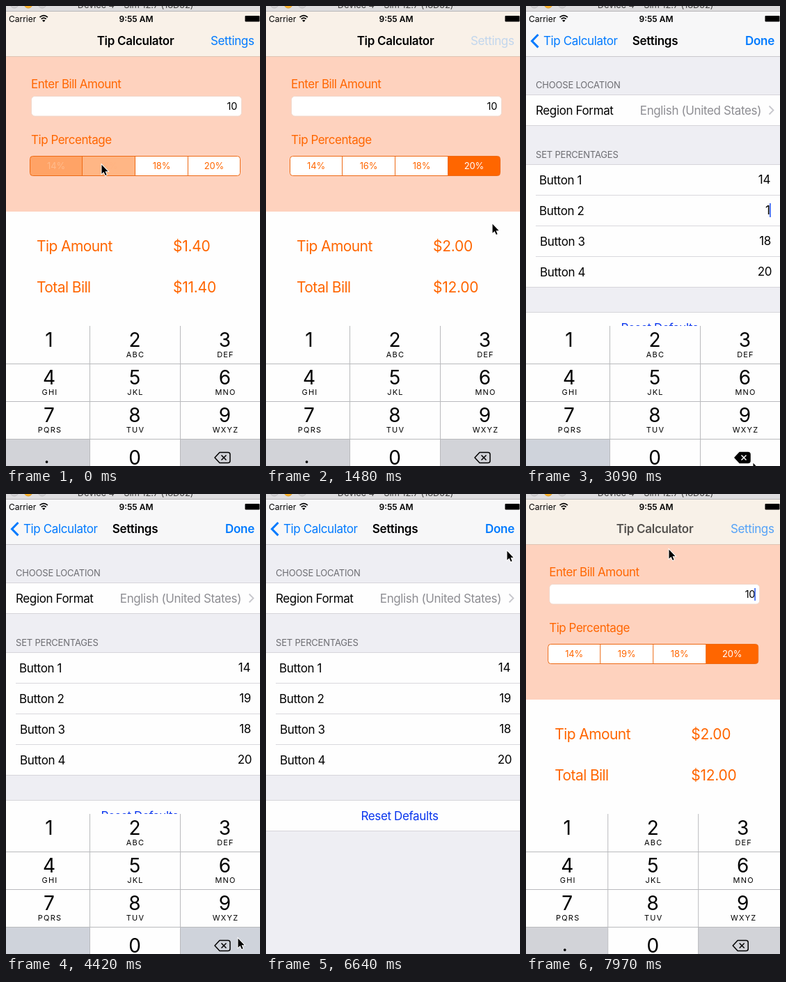
Animation, 365 px wide and 660 px high, one loop 8000 ms. Source, as an HTML page:

```html
<!DOCTYPE html>
<html lang="en">
<head>
<meta charset="utf-8">
<title>Tip Calculator</title>
<style>
html, body { margin: 0; width: 100%; height: 100%; overflow: hidden; background: #fefefe; }
svg { display: block; width: 365px; height: 660px; }
text { font: 17px Inter, "Open Sans", sans-serif; letter-spacing: -.022em; white-space: pre; }
.bold { font-weight: 600; letter-spacing: -.017em; }
.mid { text-anchor: middle; }
.end { text-anchor: end; }
.bar { font-size: 12px; letter-spacing: 0; }
.orange { fill: #ff6600; letter-spacing: -.028em; }
.big { font-size: 21px; }
.money { letter-spacing: -.012em; }
.seg { font-size: 13px; letter-spacing: -.01em; }
.amount { font-size: 14.5px; letter-spacing: -.02em; }
.head { font-size: 13px; letter-spacing: -.015em; fill: #6d6d72; }
.digit { font-size: 28px; letter-spacing: 0; }
.abc { font-size: 11px; letter-spacing: 1.2px; }
.blue { fill: #007aff; }
</style>
</head>
<body>
<svg id="stage" viewBox="0 0 365 660"></svg>
<script>
const STEP = 147.4, LOOP = 8000;
const $ = id => document.getElementById(id);
const text = (x, y, s, cls = '', id = '') => `<text x="${x}" y="${y}" class="${cls}" id="${id}">${s}</text>`;
const rect = (x, y, w, h, fill, more = '') => `<rect x="${x}" y="${y}" width="${w}" height="${h}" fill="${fill}" ${more}/>`;
const range = (n, f) => Array.from({ length: n }, (_, i) => f(i)).join('');

// Numeric keypad; name prefixes the parts that change
function keypad(name, side, dot) {
  const letters = ['', 'ABC', 'DEF', 'GHI', 'JKL', 'MNO', 'PQRS', 'TUV', 'WXYZ'];
  const cols = [62, 185, 314.5];
  return `<g id="${name}">` + rect(0, 459, 380, 201, '#fefefe') +
    rect(0, 621, 120, 39, side) + rect(250, 621, 130, 39, side, `id="${name}Del"`) +
    rect(250, 567, 130, 54, '#d0d3da', `id="${name}Nine" visibility="hidden"`) +
    range(3, i => rect(0, 513 + 54 * i, 380, 1, '#b9babd')) +
    rect(120, 459, 1, 201, '#b9babd') + rect(250, 459, 1, 201, '#b9babd') +
    range(9, i => {
      const x = cols[i % 3], y = 489 + 54 * Math.floor(i / 3);
      return text(x, y, i + 1, 'digit mid') + text(x + 1, y + 15, letters[i], 'abc mid');
    }) +
    text(185, 658, 0, 'digit mid') + (dot ? text(58.5, 656, '.', 'digit mid') : '') +
    `<path id="${name}Icon" d="M307 640.5H319Q322 640.5 322 643.5V652.5Q322 655.5 319 655.5H307L300 648Z"
      fill="none" stroke="#000" stroke-width="1.5" stroke-linejoin="round"/>
    <path id="${name}Cross" d="M309.5 644.5l7 7m0-7l-7 7" stroke="#000" stroke-width="1.5"/></g>`;
}

const segX = [34.5, 109.5, 185.5, 261.5, 336.5];
const mainView = '<g id="main">' +
  rect(0, 72, 380, 223, '#fed2be') + rect(0, 295, 380, 365, '#fefefe') +
  text(36, 118, 'Enter Bill Amount', 'orange') +
  rect(36.5, 129.5, 302, 28.5, '#fff', 'rx="5" stroke="#f0d8cc"') +
  text(332, 149, '10', 'amount end') +
  rect(331, 135, 1.7, 18, '#426bf2', 'id="billCaret"') +
  text(36, 198, 'Tip Percentage', 'orange') +
  rect(34.5, 215.5, 302, 28, '#fff', 'rx="4"') +
  '<clipPath id="round">' + rect(34.5, 215.5, 302, 28, '#fff', 'rx="4"') + '</clipPath><g clip-path="url(#round)">' +
  range(4, i => rect(segX[i], 215, segX[i + 1] - segX[i], 29, '#ff6600', `id="fill${i}"`)) + '</g>' +
  '<path d="M109.5 216v27m76-27v27m76-27v27" stroke="#ee6a14"/>' +
  rect(34.5, 215.5, 302, 28, 'none', 'rx="4" stroke="#ee6a14"') +
  range(4, i => text((segX[i] + segX[i + 1]) / 2, 234, '', 'seg mid', 'seg' + i)) +
  text(44, 352, 'Tip Amount', 'big orange') + text(240, 352, '', 'big orange money', 'tip') +
  text(44, 411, 'Total Bill', 'big orange') + text(240, 411, '', 'big orange money', 'total') +
  keypad('pad', '#d2d3d8', true) + '</g>';

const card = (y, h) => rect(0, y, 380, h, '#d6d5da') + rect(0, y + 1, 380, h - 2, '#fefefe');
const settingsView = '<g id="settings">' + rect(0, 72, 380, 588, '#eeeef3') +
  text(14, 118, 'CHOOSE LOCATION', 'head') + card(127, 45) +
  text(14, 155.5, 'Region Format') +
  '<g fill="#8e8e93">' + text(338, 155.5, 'English (United States)', 'end') + '</g>' +
  '<path d="M349.5 143.5l6 6-6 6" fill="none" stroke="#c7c7cc" stroke-width="1.8"/>' +
  text(14, 218, 'SET PERCENTAGES', 'head') + card(227, 177) +
  range(3, i => rect(14, 271 + 44 * i, 366, 1, '#d9d8dd')) +
  range(4, i => text(i < 2 ? 19 : 20, 256 + 44 * i, 'Button ' + (i + 1)) +
    text([351, 352, 352, 353][i], 255.3 + 44 * i, 14 + 2 * i, 'end', 'value' + i)) +
  rect(350, 283, 1.8, 20, '#426bf2', 'id="caret"') +
  card(439, 45) + '<g fill="#0a36ee">' + text(192, 468, 'Reset Defaults', 'mid') + '</g>' +
  keypad('keys', '#cfd3db', false) + '</g>';

const chrome = rect(0, 8, 365, 64, '#f9f1e8') + rect(0, 72, 365, 1, '#dfc4b4') +
  '<g id="plainBar">' + rect(0, 8, 365, 64, '#f7f7f8') + rect(0, 72, 365, 1, '#c9c8cd') + '</g>' +
  '<g id="mainNav">' + text(186, 56, 'Tip Calculator', 'bold mid', 'mainTitle') +
  text(356.5, 56, 'Settings', 'blue end', 'open') + '</g>' +
  '<g id="setNav"><path d="M17.5 41l-9 9.2 9 9.2" fill="none" stroke="#007aff" stroke-width="3"/>' +
  text(25, 56, 'Tip Calculator', 'blue', 'back') + text(185.5, 56, 'Settings', 'bold mid', 'setTitle') +
  text(357, 56, 'Done', 'blue bold end', 'done') + '</g>' +
  text(4, 22.5, 'Carrier', 'bar') + text(187, 22.5, '9:55 AM', 'bar bold mid') +
  `<g fill="none" stroke="#000" stroke-width="1.7"><path d="M48.5 16.2q5.7-5.2 11.4 0M50.7 18.7q3.5-3.2 7 0"/></g>
  <path d="M54.2 23l-2.2-2.3q2.2-1.8 4.4 0z"/>` +
  rect(343.5, 14, 21, 8.5, '#000', 'rx="1"') +
  rect(0, 0, 365, 8, '#dedddf') + rect(0, 7, 365, 1, '#b9b8ba') +
  range(3, i => `<circle cx="${12 + 20 * i}" cy="-3" r="6" fill="${i === 1 ? '#fcb32b' : '#d0cfd1'}" stroke="${i === 1 ? '#e0a028' : '#bdbcbe'}"/>`) +
  '<g fill="#444">' + text(186, 3, 'Device 4 – Sim 12.7 (18D52)', 'seg mid') + '</g>';

$('stage').innerHTML = mainView + settingsView + chrome +
  `<path id="cursor" d="M.5 .8V13.800L3.500 11 5.800 16 7.600 15.200 5.500 10.200H9.500Z"
    stroke="#fff" stroke-width="1.8" paint-order="stroke"/>`;

// Pointer path: step, x, y
const path = [
  [0, 137, 227], [1, 139, 228], [3, 215, 230], [4, 224, 230], [5, 285, 229], [6, 294, 228],
  [7, 320, 80], [8, 325, 45], [9, 326, 60], [10, 325, 312], [12, 336, 314], [15, 345, 300],
  [17, 345, 294], [18, 342, 330], [20, 322, 648], [21, 326, 655], [23, 325, 650], [26, 318, 592],
  [28, 318, 592], [30, 333, 637], [33, 332, 634], [36, 262, 428], [40, 262, 428], [41, 264, 427],
  [42, 264, 427], [45, 346, 81], [46, 353, 62], [47, 345, 50], [50, 343, 52], [52, 318, 58], [54, 205, 79]
];
const clamp = v => Math.max(0, Math.min(1, v));
const ease = v => 1 - (1 - clamp(v)) ** 2;
const spring = t => t <= 0 ? 0 : 1 - (1 + 18 * t) * Math.exp(-18 * t);
const within = (k, a, b) => k >= a && k <= b;
const set = (id, name, v) => $(id).setAttribute(name, v);
const move = (id, x, y = 0) => set(id, 'transform', `translate(${x} ${y})`);
const show = (id, on) => set(id, 'visibility', on ? 'visible' : 'hidden');

function pointer(k) {
  const i = path.findIndex(p => p[0] >= k);
  if (i < 0) return path.at(-1).slice(1);
  if (!i) return path[0].slice(1);
  const [a, b] = [path[i - 1], path[i]], f = (k - a[0]) / (b[0] - a[0]);
  return [1, 2].map(n => a[n] + (b[n] - a[n]) * f);
}

function drawMain(k) {
  const pct = [14, k < 21 ? 16 : 19, 18, 20];
  const chosen = k < 1 ? 0 : k < 4 ? 1 : k < 6 ? 2 : 3;
  const pressing = [0, 3, 5].includes(k);
  pct.forEach((p, i) => {
    const on = i === chosen, held = pressing && i === chosen + 1;
    set('fill' + i, 'fill-opacity', on ? (pressing ? .6 : 1) : held ? .48 : 0);
    set('seg' + i, 'fill', on ? (pressing ? '#ffbb8c' : '#fff') : held ? '#ffb482' : '#ff6600');
    $('seg' + i).textContent = p + '%';
  });
  const tip = pct[chosen] / 10;
  $('tip').textContent = '$' + tip.toFixed(2);
  $('total').textContent = '$' + (10 + tip).toFixed(2);
  show('billCaret', within(k, 4, 6) || k > 51);
}

function drawSettings(k) {
  $('value1').textContent = k < 21 ? 16 : k < 27 ? 1 : 19;
  set('value1', 'x', within(k, 21, 26) ? 350.5 : 352);
  show('caret', within(k, 17, 24) || within(k, 27, 29) || within(k, 34, 36));
  const up = k < 36 ? ease((k - 17) / 3) : 1 - ease((k - 36) / 3);
  move('keys', 0, 205 * (1 - up));
  show('keysNine', within(k, 27, 28));
  const del = within(k, 21, 22);
  set('keysDel', 'fill', del ? '#fefefe' : '#cfd3db');
  set('keysIcon', 'fill', del ? '#000' : 'none');
  set('keysCross', 'stroke', del ? '#fff' : '#000');
}

function drawTransition(k) {
  const leaving = k > 40;
  const t = leaving ? (k - 54) * STEP / 1000 + .31 : (k - 10) * STEP / 1000 - .047;
  const p = leaving ? 1 - spring(t) : spring(t);
  const fade = clamp(t / .47), gone = clamp(1 - 1.6 * fade);
  move('main', -112 * p);
  move('settings', 375 * (1 - p));
  set('plainBar', 'opacity', p);
  set('mainNav', 'opacity', leaving ? fade : gone);
  set('setNav', 'opacity', leaving ? gone : fade);
  move('mainTitle', -40 * p);
  move('back', 105 * (1 - p));
  move('setTitle', 150 * (1 - p));
  set('open', 'opacity', within(k, 8, 12) ? .22 : 1);
  set('done', 'opacity', within(k, 47, 51) ? .25 : 1);
}

function frame(now) {
  const k = Math.floor(now % LOOP / STEP + .1);
  drawMain(k);
  drawSettings(k);
  drawTransition(k);
  move('cursor', ...pointer(k));
  requestAnimationFrame(frame);
}
frame(0);
</script>
</body>
</html>
```
